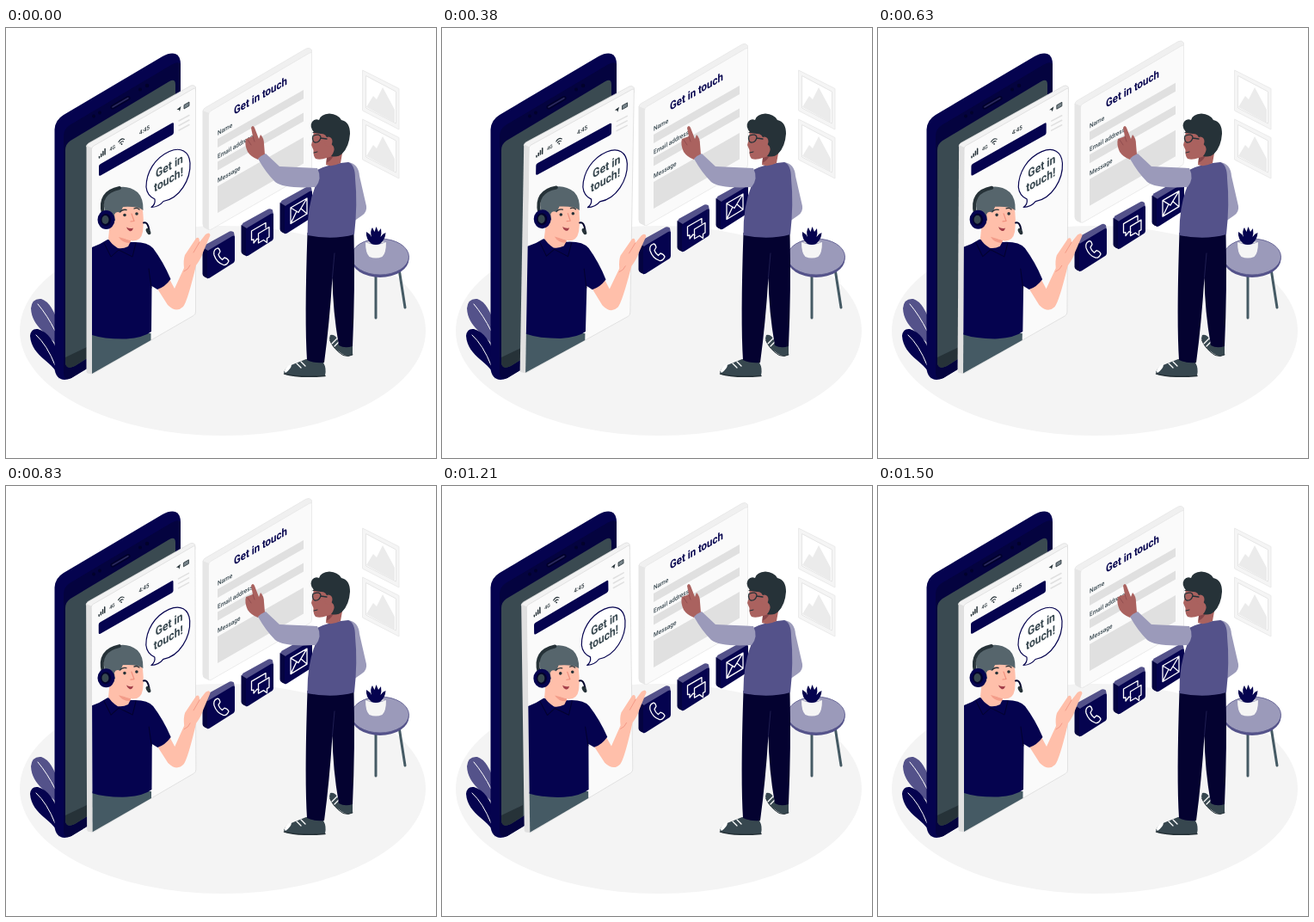
Animation of 500x500 px, one loop 1.54 s. Source, as an HTML page:

```html
<!DOCTYPE html>
<html lang="en">
<head>
<meta charset="utf-8">
<style>
  html, body { margin: 0; height: 100%; overflow: hidden; background: #fff; }
  svg { display: block; width: 100%; height: 100%; font-family: Roboto, sans-serif; }
  .navy { fill: #05034f; } .mid { fill: #54528a; } .pale { fill: #9b9aba; }
  .slate { fill: #455a64; } .dark { fill: #263238; } .steel { fill: #37474f; }
  .skin { fill: #ffbfaa; } .brown { fill: #aa625f; }
  .grey { fill: #e0e0e0; } .face { fill: #fafafa; }
  .line { fill: none; stroke-linecap: round; stroke-linejoin: round; }
  .white { stroke: #fff; stroke-width: 1.3; }
  .ink { stroke: #263238; }
  .bold { font-weight: 700; }
  .label { font-size: 7.5px; font-weight: 500; fill: #37474f; }
</style>
</head>
<body>
<svg viewBox="0 0 500 500">
  <defs>
    <g id="picture">
      <path fill="#f5f5f5" stroke="#ebebeb" d="M414.500 49 L457 70.500 V118 L414.500 96Z"/>
      <path fill="#fff" stroke="#e6e6e6" d="M418.500 55.500 L453.500 74 V111 L418.500 93Z"/>
      <path fill="#ebebeb" d="M419 92 L427 79 L431 83 L438 69 L452 95 V110Z"/>
    </g>
    <g id="tile">
      <path class="mid" d="M229 256 Q229 254 231 252.500 L260 236.500 Q262 235.500 265 237.500 L266 243 L235 261Z"/>
      <path fill="#040340" d="M228.500 255 L235 259 V291.500 L231 289.500 Q228.500 288 228.500 286Z"/>
      <path class="navy" d="M234 262 Q234 259 237 257.500 L263 242 Q266 240.500 266 243 V269.500 Q266 272.500 263 274 L237 290.500 Q234 292 234 289.500Z"/>
    </g>
  </defs>

  <ellipse cx="252" cy="352" rx="236" ry="122" fill="#f4f4f4"/>
  <use href="#picture"/>
  <use href="#picture" y="57"/>

  <!-- leaves -->
  <path class="mid" d="M62 372 C50 356 30 348 29 326 Q30 314 41 315 Q54 319 62 348Z"/>
  <path class="navy" d="M62 408 C58 388 30 384 28 358 Q29 349 37 350 Q55 355 62 385Z"/>
  <path class="line" stroke="#fff" d="M37 321 Q48 334 57 352 M35 357 Q48 369 57 392"/>

  <!-- phone -->
  <path class="navy" d="M56.500 118 Q57 107 67 101 L182 33 C195 26 203 30 203 42 V330 L76 407 C65 412 57 407 56.500 395Z"/>
  <path fill="#04033f" d="M67 126 Q67 118 74 113 L192 43 Q200 38 203 42 V330 L76 407 Q67 411 67 400Z"/>
  <path fill="#3a4a51" d="M69 142 Q69 135 75 131 L190 62 Q197 58 197 66 V320 L80 393 Q69 398 69 388Z"/>
  <path class="dark" d="M69 383 L94 371 V384 L80 393 Q69 398 69 388Z"/>
  <path class="line" stroke="#02022c" stroke-width="5" d="M124 92 L142 81.500"/>
  <path class="line" stroke="#2c2b5e" stroke-width="1.500" d="M124 92 L142 81.500"/>
  <g fill="#02022c">
    <circle cx="102" cy="102.500" r="2"/><circle cx="109" cy="98.500" r="2"/>
    <circle cx="156" cy="71.500" r="2"/><circle cx="164" cy="67" r="2.300"/>
  </g>

  <g id="form">
    <path fill="#f0f0f0" stroke="#e4e4e4" stroke-width=".7" d="M229 97 Q229 94 232 92.500 L349 24 Q353 22 355.500 25.500 V29 L236 100Z"/>
    <path fill="#e6e6e6" d="M228.500 96 L236 99 V235 L231 232.500 Q228.500 231 228.500 228Z"/>
    <path class="face" stroke="#e4e4e4" stroke-width=".7" d="M235.500 101 Q235.500 98 238 96.500 L353 29 Q355.500 27.500 355.500 30 V164 Q355.500 167 353 168.500 L239 234 Q235.500 236 235.500 232Z"/>
    <path class="grey" d="M246 129 L346 72 V82 L246 139Z M246 155.500 L346 98.500 V108.500 L246 165.500Z M246 184 L346 127 V157.500 L246 215Z"/>
    <text class="bold navy" font-size="13.200" transform="matrix(.866 -.5 0 1 265 101)">Get in touch</text>
    <g class="label">
      <text transform="matrix(.866 -.5 0 1 246 125)">Name</text>
      <text transform="matrix(.866 -.5 0 1 246 152)">Email address</text>
      <text transform="matrix(.866 -.5 0 1 246 180)">Message</text>
    </g>
    <use href="#tile"/><use href="#tile" x="45" y="-26"/><use href="#tile" x="90" y="-52"/>
    <g class="line white">
      <path d="M244 257 Q241 259 242 264 Q245 273 253 275.500 Q257 276 259 271 Q258 268 254 267 L251.500 269.500 Q248 267 247 263.500 L249 260 Q248 256 246 256Z"/>
      <path d="M294 246 L292 245 L288 250 V246 L285.500 246.500 V236 L302 226.500 V232"/>
      <path d="M293.500 239 L306 231.500 V243 L303.500 244.500 V249.500 L299.500 246.500 L293.500 250Z"/>
      <path d="M331 209 L350 198 V216 L331 227.500Z L340 214.500 L350 198 M331 227.500 L338 213 M350 216 L343 210"/>
    </g>
  </g>

  <g id="screen">
    <path fill="#f2f2f2" stroke="#dcdcdc" stroke-width=".7" d="M93.500 138 Q93.500 135.500 96 134 L215 67 Q218 65.500 220.500 68.500 V74 L100 141Z"/>
    <path fill="#e0e0e0" d="M93.500 136.500 L100 139.500 V402.500 L95 401.500 Q93.500 401 93.500 399Z"/>
    <path class="face" stroke="#dcdcdc" stroke-width=".8" d="M99.500 141 Q99.500 138.500 102 137 L218 70.500 Q220.500 69 220.500 72 V330 Q220.500 333 218 334.500 L102 401.500 Q99.500 403 99.500 400Z"/>

    <!-- status bar -->
    <path class="line ink" stroke-width="1.500" d="M108.500 151 V149.500 M110.700 149.500 V146.500 M112.900 148 V143.500 M115.100 147 V140.500"/>
    <g class="dark" font-weight="500">
      <text font-size="6" transform="matrix(.866 -.5 0 1 120.500 143.500)">4G</text>
      <text font-size="7" transform="matrix(.866 -.5 0 1 155 124.500)">4:45</text>
    </g>
    <path class="line ink" stroke-width="1.100" d="M131 132.500 Q134 127.500 137.500 129.500 M132.500 134 Q134.500 131 136.500 132"/>
    <circle class="dark" cx="134.500" cy="135" r=".9"/>
    <path class="dark" d="M198.500 95 L203.500 91 L202 97 L201 95Z"/>
    <path fill="#78858b" stroke="#263238" stroke-width=".8" d="M207 89.500 L213 86 V90.500 L207 94Z"/>
    <path class="navy" d="M108 161 Q108 159 110 158 L193 110.500 Q195 109.500 195 111.500 V121.500 Q195 123.500 193 124.500 L110 171.500 Q108 172.500 108 170.500Z"/>
    <path class="line" stroke="#e0e0e0" stroke-width="1.500" d="M201 108 L213 101.500 M201 113.500 L213 107 M201 119 L213 112.500"/>

    <!-- speech bubble -->
    <path fill="#fff" stroke="#05034f" stroke-width="1.200" stroke-linejoin="round" d="M173 199 Q174 205 169 208.500 Q178 208 183 201.500 C202 198 215 176 214 157 C213 143 203 138 190 143.500 C173 151 163 168 163 185 Q164 195 173 199Z"/>
    <g class="bold" font-size="14" fill="#37474f">
      <text transform="matrix(.866 -.5 0 1 174 174.500)">Get in</text>
      <text transform="matrix(.866 -.5 0 1 172 191)">touch!</text>
    </g>

    <!-- agent -->
    <path class="skin" d="M174 300 L188 322 Q198 332 206 324 Q211 318 221 276 Q227 268 229 261 L237.500 241 Q237 236.500 232 240 L225 249 Q225 242 221 244.500 L208 264 Q206 270 207 279 L196 303 L189 290Z"/>
    <path class="line" stroke="#f0917f" stroke-width=".8" d="M225 249 L218 261 M207 283 Q212 281 214 276"/>
    <path class="slate" d="M100 355 H168.500 V363 L100 402Z"/>
    <path class="navy" d="M100 255 Q109 252 118 246 L146 249 Q164 248 171 256 Q183 272 191.500 292 Q185 301 176 304 L169.500 300 L169 353 Q160 360 140 361.500 Q115 362 100 357Z"/>
    <path class="line" stroke="#03022e" d="M169 302 L166 280 M114 250 L122 266 L131 258 L147 266 L151 250"/>
    <path class="skin" d="M121 225 H145 V248 L142 254 Q136 257 130 256 Q122 251 119 245Z"/>
    <path fill="#f39c89" d="M131 243 L145 247 L144 250 Q135 250 131 243Z"/>
    <path class="skin" d="M122 210 Q138 197 158 206 Q161 222 159 237 Q157 248 147 247.500 Q132 245 123 232Z"/>
    <path fill="#56656c" d="M116 218 Q109 194 125 187 Q140 181 153 191 Q160 198 159.500 212 Q153 207 136 208 L133 215 Q128 212 126 217 L127 224 H118Z"/>
    <path class="line" stroke="#263238" stroke-width="4" d="M113 216 Q107 191 132 186"/>
    <ellipse class="navy" cx="116.500" cy="223" rx="10" ry="11"/>
    <ellipse fill="#02022c" cx="116" cy="223" rx="6" ry="7"/>
    <ellipse class="steel" cx="115.500" cy="223" rx="4" ry="5"/>
    <path class="line" stroke="#02022c" stroke-width="2" d="M160 226.500 Q165 225 166.500 235"/>
    <ellipse class="dark" cx="165.500" cy="236.500" rx="2.300" ry="4" transform="rotate(-28 165.500 236.500)"/>
    <g class="dark"><circle cx="138" cy="217.500" r="1.800"/><circle cx="152" cy="216" r="1.800"/></g>
    <path class="line ink" stroke-width="1.300" d="M133 213.500 Q136 210.500 140 211.500 M149 210 Q152 208.500 155 211"/>
    <path class="line" stroke="#f0917f" stroke-width="1.200" d="M146 216 L149 224.500 L145 225"/>
    <path fill="#a33f4a" d="M140 231.500 Q144 234 148 232.500 Q147 237 143.500 236 Q141 235 140 231.500Z"/>
  </g>

  <!-- table and pot -->
  <path class="line" stroke="#455a64" stroke-width="3" d="M430 286 V337 M457 280 L464 325"/>
  <ellipse class="mid" cx="435" cy="268.500" rx="33.500" ry="21.500"/>
  <ellipse class="pale" cx="435" cy="266" rx="33.500" ry="21" stroke="#54528a" stroke-width=".8"/>
  <path fill="#f5f5f5" d="M418 249 Q430 255 442 249 Q442 262 437.500 266 Q430 269 422.500 266 Q418 262 418 249Z"/>
  <path class="grey" d="M419 249 Q430 245 441 249 Q430 253 419 249Z"/>
  <path class="navy" d="M425 251 Q418 245 419 237 Q423 239 425 243 Q423 236 426 232 L428.500 237 L430.500 231 L433 237 L436 233 Q437 239 435.500 243 Q438 239 441.500 238 Q441 246 435 251 Q430 253 425 251Z"/>

  <!-- visitor -->
  <path class="steel" d="M377 357 Q383 355 387 365 L403 369 V380 Q397 383 391 379 Q378 371 376 361Z"/>
  <path class="line" stroke="#263238" d="M376.500 363 Q381 374 392 380.500 Q398 383 403 380"/>
  <path class="line white" d="M379 367 L385 361 M382 370 L387 365"/>
  <path class="steel" d="M323 400 Q325 394 334 391 L349 385 L369 389 Q373 396 371 404 Q345 407 325 403Z"/>
  <path fill="#fff" d="M323.500 399 Q326 393 332 391 Q332 396 325 401Z"/>
  <path class="line white" d="M338 390 L343 395 M343 388 L348 393"/>
  <path class="line" stroke="#263238" stroke-width="1.500" d="M323.500 402 Q340 407 371 404.500"/>
  <path fill="#040230" d="M350.500 238 H404.500 Q406 305 403 370 Q394 373 387 369 Q380 330 379.500 290 Q376 345 370 389 Q358 390 350 386 Q347 340 350.500 238Z"/>
  <path class="line" stroke="#26255a" stroke-width=".8" d="M379.500 290 L382 262"/>
  <path class="pale" d="M398 156 Q410 158 411 172 L419 207 Q420 214 414 218 L404 225Z"/>
  <path class="mid" d="M362 165 Q375 158 398 156 Q406 159 406 175 Q409 205 405 240 Q380 247 350.500 241 Q350 207 360 183Z"/>
  <path class="brown" d="M301 147 L300 135 Q300 128 296 124 L294 129 L289 116 Q287 112 285 116 L287 126 L279 129 Q277 135 281 144 Q285 150 293 153Z"/>
  <path class="line" stroke="#87464a" stroke-width=".7" d="M287 126 L289 132 M281 130 L285 136"/>
  <path class="pale" d="M293 152 Q297 148 302 146 L318 161 L362 163 Q368 175 360 185 Q323 187 313 179 Q302 168 293 152Z"/>
  <path class="brown" d="M358 116 H380 L392 140 L389 157 Q379 162 372 159 L373 151 Q365 154 360 152 Q357 149 357.500 142 L355 136 L357 129Z"/>
  <path fill="#87464a" d="M373 151 Q379 150 382 146 Q379 154 372.500 157Z"/>
  <path class="dark" d="M359 122 Q352 115 356 109 Q359 105 364 107 Q366 100 376 99.500 Q386 100 390 107 Q400 109 400 123 Q399 138 391 146 Q386 151 378 149 Q383 143 381 138 L374 130 Q372 122 366 123Z"/>
  <ellipse class="brown" cx="375" cy="132" rx="4.500" ry="5.500"/>
  <path class="line ink" stroke-width="1.300" d="M357 125.500 Q365 122 366 127 Q365 133.500 359 133 Q355.500 131 357 125.500 M366 128 L373 129"/>
  <path class="line ink" d="M357 121.500 L363 121 M358 145 L362 144"/>
</svg>
<script>
  const LOOP = 1540, CYCLE = 36, STEPS_PER_MS = 0.024;
  const form = document.getElementById('form');
  const panel = document.getElementById('screen');

  function draw(now) {
    // motion advances in 24 steps per second
    const step = Math.floor((now % LOOP + 4) * STEPS_PER_MS);
    const p = step % CYCLE / CYCLE;
    const lift = -20 * Math.min(p, 1 - p);
    const tilt = p < .25 ? 4 * p : p < .75 ? 2 - 4 * p : 4 * p - 4;
    form.setAttribute('transform', `translate(0 ${lift})`);
    panel.setAttribute('transform', `rotate(${tilt} 165 235)`);
    requestAnimationFrame(draw);
  }
  draw(performance.now());
</script>
</body>
</html>
```
